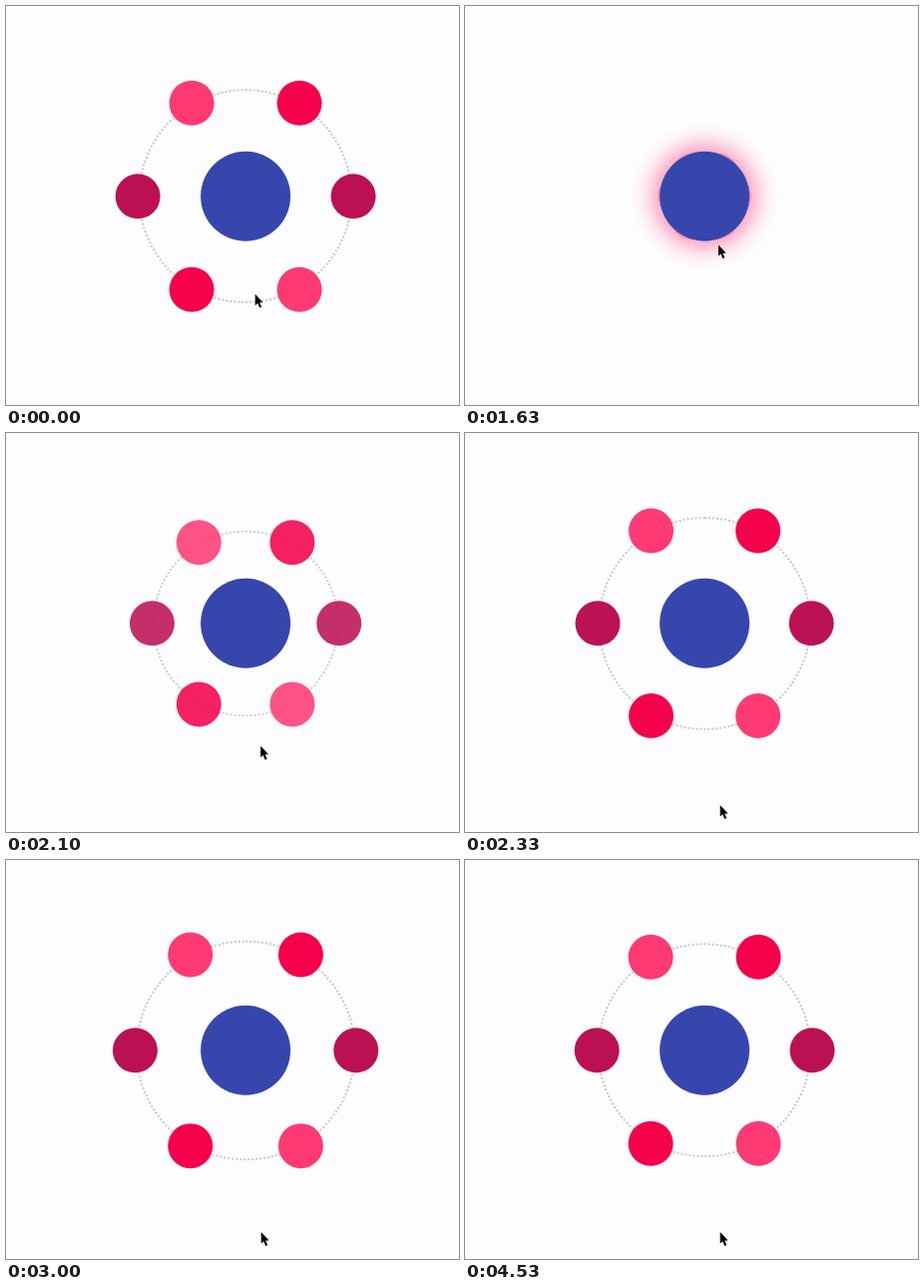
These frames come from a looping animation (454 px wide and 400 px high, 4560 ms). An HTML page:

```html
<!DOCTYPE html>
<html lang="en">
<head>
<meta charset="utf-8">
<title>Elastic orbit</title>
<style>
  html, body { margin: 0; width: 100%; height: 100%; overflow: hidden; background: #fdfcff; }
  #stage { position: relative; width: 454px; height: 400px; overflow: hidden; }
  #stage > * { position: absolute; left: 0; top: 0; }
  .disc { border-radius: 50%; }
  #ring { box-sizing: border-box; border: 2px dotted #c8c8ca; border-radius: 50%; }
  .moon { width: 45px; height: 45px; }
  #glow, #core { width: 90px; height: 90px; transform: translate(195.1px, 145.8px); }
  #glow { box-shadow: 0 0 22px 7px #ff1f66; }
  #core { background: #3646ac; }
  svg { overflow: visible; }
</style>
</head>
<body>
<div id="stage">
  <div id="glow" class="disc"></div>
  <div id="ring"></div>
  <div id="core" class="disc"></div>
  <svg id="pointer" width="20" height="20">
    <path id="arrow" d="M.7.8V12.3L3.2 10L5.2 14.6L7.2 13.7L5.2 9.2H8.6Z"
      fill="#000" stroke="#fff" stroke-width="1" paint-order="stroke"/>
    <g id="hand" fill="#fff" stroke="#000" stroke-linejoin="round">
      <path d="M-1.8 1.4Q-1.2 0 .3 1L2.6 5.2Q3.7 4.2 4.8 5.2Q6 4.4 6.9 5.8Q8.2 5.4 8.6 7L9 10.6L8.2 14L2.2 15L-1 11.8L-2.9 9.4Q-2.7 7.8-1.2 8.2L.4 9Z"/>
      <path d="M2.8 9.4L3.5 12.4M4.8 9L5.4 12M6.7 8.7L7.1 11.6" stroke-width=".7"/>
    </g>
  </svg>
</div>
<script>
const LOOP = 4560, REST = 108, CX = 240.1, CY = 190.8, MOON = 22.5;
const ENTER = 924, LEAVE = 1590, CROSS = 1765;
const DECAY = 0.0024, FREQ = 0.011, SWING = 61;
const COLORS = ['#bb1154', '#ff3974', '#f4004b'];

// time, x, y of the pointer tip
const PATH = [
  [0, 249, 288], [29.9, 249, 288], [30, 246, 283], [200, 246, 283],
  [700, 247, 262], [921, 248, 235], [1000, 248, 213], [1200, 250, 200],
  [1400, 252, 205], [1590, 253, 236], [1870, 254, 253.3],
  [2330, 255, 372.3], [LOOP, 255, 372.3]
];

const $ = id => document.getElementById(id);
const clamp = v => Math.max(0, Math.min(1, v));
const move = (el, x, y) => { el.style.transform = `translate(${x}px, ${y}px)`; };
const ring = $('ring'), glow = $('glow');

const moons = Array.from({ length: 6 }, (_, i) => {
  const el = document.createElement('div');
  el.className = 'disc moon';
  el.style.background = COLORS[i % 3];
  $('stage').insertBefore(el, $('core'));
  return { el, angle: i * Math.PI / 3 };
});

// Damped spring: pulled to the centre while hovered, then let go.
function radius(t) {
  if (t < ENTER) return REST;
  if (t < LEAVE) {
    const s = t - ENTER, a = FREQ * s;
    return REST * Math.exp(-DECAY * s) * (Math.cos(a) + DECAY / FREQ * Math.sin(a));
  }
  const s = t - CROSS;
  return REST + SWING * Math.exp(-DECAY * s) * Math.sin(FREQ * s);
}

function tip(t) {
  const i = PATH.findIndex(p => p[0] > t);
  const [t0, x0, y0] = PATH[i - 1], [t1, x1, y1] = PATH[i];
  const k = (t - t0) / (t1 - t0);
  return [x0 + (x1 - x0) * k, y0 + (y1 - y0) * k];
}

function draw(t) {
  const r = radius(t), alpha = clamp(r / REST), size = Math.max(0, r - 0.3);
  for (const { el, angle } of moons) {
    move(el, CX - MOON + r * Math.cos(angle), CY - MOON + r * Math.sin(angle));
    el.style.opacity = alpha;
  }
  ring.style.width = ring.style.height = 2 * size + 'px';
  ring.style.opacity = alpha;
  move(ring, CX - size, CY - size);
  glow.style.opacity = clamp((t - ENTER) / 75) * clamp((LEAVE + 80 - t) / 80);

  const over = t >= ENTER && t < LEAVE;
  move($('pointer'), ...tip(t));
  $('arrow').style.display = over ? 'none' : '';
  $('hand').style.display = over ? '' : 'none';
}

const start = performance.now();
function tick() {
  draw((performance.now() - start) % LOOP);
  requestAnimationFrame(tick);
}
tick();
</script>
</body>
</html>
```
